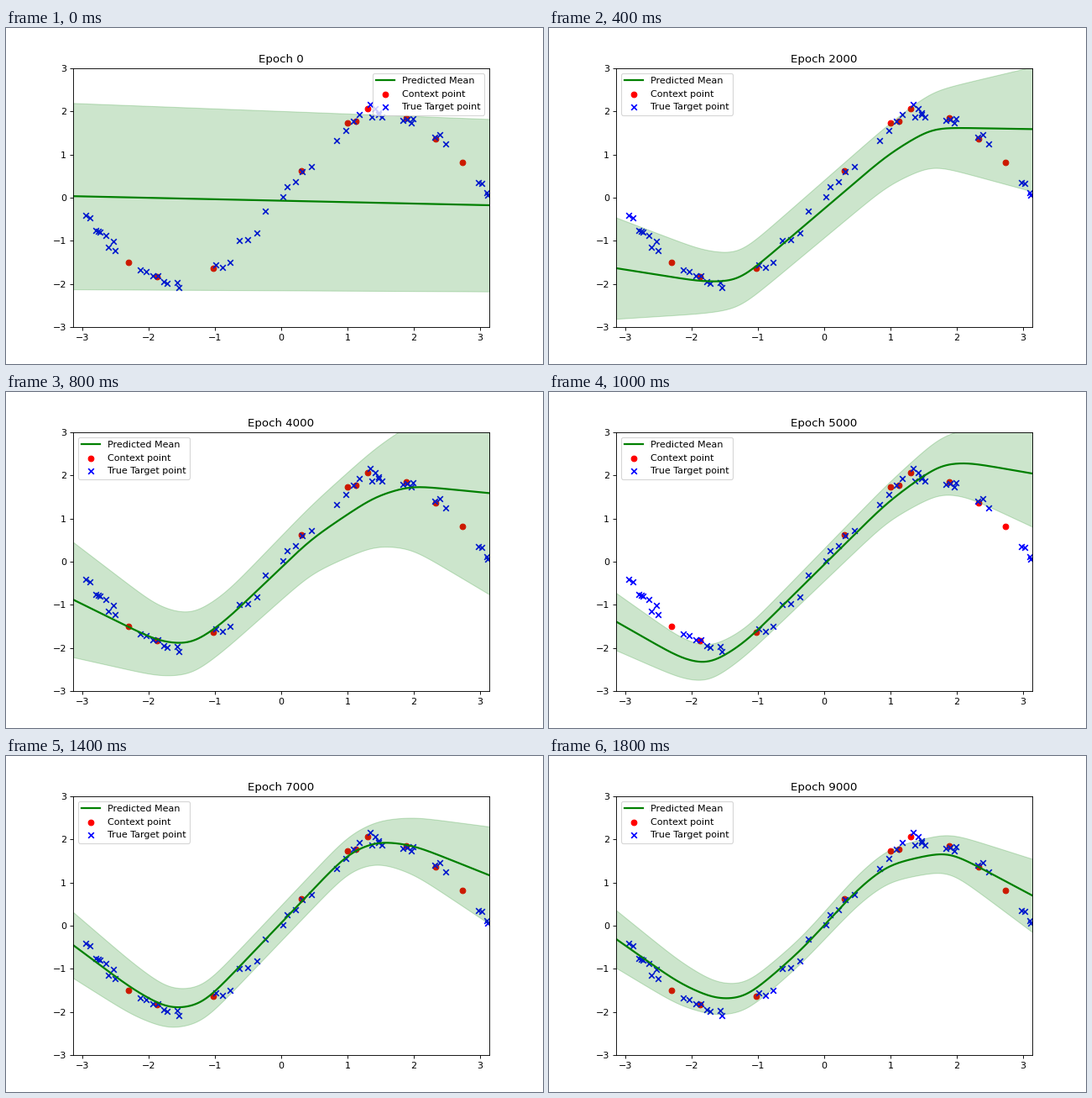
Recreate the animation shown at these times as a matplotlib script. Size 640 px wide and 400 px high, loop 2 s.

```python
import numpy as np
import matplotlib.pyplot as plt
from matplotlib.animation import FuncAnimation

PI = np.pi
GRID = np.linspace(-PI, PI, 300)
SOFT = 0.12   # how widely a curve rounds its corners
NOISE = 0.09

CONTEXT = np.array([
    (-2.30, -1.50), (-1.88, -1.83), (-1.02, -1.64), (0.305, 0.62), (1.00, 1.73),
    (1.13, 1.77), (1.30, 2.06), (1.89, 1.85), (2.325, 1.36), (2.74, 0.82),
])

# Groups of target points along x: first, last, count
GROUPS = [
    (-2.94, -2.48, 9), (-2.13, -1.52, 8), (-1.01, -0.24, 7), (0, 0.44, 5),
    (0.87, 1.20, 4), (1.33, 1.53, 6), (1.84, 2.00, 4), (2.33, 2.49, 3), (2.98, 3.12, 4),
]

# Epoch in thousands -> corners of the fit: x, mean, spread
CORNERS = {
    0: [(-PI, .035, 2.16), (PI, -.175, 2)],
    1: [(-PI, -1.49, 1.355), (-1.73, -1.49, 1.19), (1.05, .94, 1.235),
        (1.8, 1.44, 1.42), (PI, 1.43, 1.65)],
    2: [(-PI, -1.635, 1.175), (-1.85, -1.95, .735), (-1.3, -1.96, .625),
        (.95, .99, .7), (1.62, 1.63, .85), (PI, 1.59, 1.445)],
    4: [(-PI, -.88, 1.335), (-1.85, -1.86, .8), (-1.35, -1.95, .69),
        (-.85, -1.39, .645), (.45, .53, .79), (1.4, 1.51, 1.12),
        (1.95, 1.77, 1.44), (PI, 1.59, 2.35)],
    5: [(-PI, -1.39, .665), (-2.15, -2.26, .46), (-1.75, -2.43, .4),
        (-1.2, -1.89, .31), (.95, 1.38, .43), (1.75, 2.28, .65),
        (2.15, 2.31, .79), (PI, 2.045, 1.235)],
    7: [(-PI, -.45, .765), (-2.25, -1.47, .61), (-1.7, -1.96, .46),
        (-1.2, -1.87, .4), (1.02, 1.71, .42), (1.45, 1.98, .48),
        (2, 1.87, .66), (PI, 1.17, 1.13)],
    9: [(-PI, -.31, .67), (-2.2, -1.33, .52), (-1.65, -1.72, .38),
        (-1.2, -1.71, .315), (-.35, -.58, .3), (.5, .85, .35),
        (.95, 1.42, .385), (1.87, 1.74, .43), (PI, .7, .85)],
}

# Epochs between two fits: earlier, later, weight of the later
BLENDS = {3: (2, 4, .5), 6: (5, 7, .4), 8: (7, 9, .15)}


def noisy_sine(seed=4):
    """Target points scattered around 2 sin(x)."""
    rng = np.random.default_rng(seed)
    x = np.concatenate([np.linspace(*group) for group in GROUPS])
    x += rng.normal(0, 0.015, x.size)
    return x, 2 * np.sin(x) + rng.normal(0, NOISE, x.size)


def bend(x, y):
    """Polyline through the corners, each one rounded by a softplus hinge."""
    slope = np.diff(y) / np.diff(x)
    curve = y[0] + slope[0] * (GRID - x[0])
    for corner, turn in zip(x[1:-1], np.diff(slope)):
        curve += turn * SOFT * np.logaddexp(0, (GRID - corner) / SOFT)
    return curve


def fit(corners):
    x, mean, spread = np.array(corners).T
    return np.array([bend(x, mean), bend(x, spread)])


target = noisy_sine()
curves = {epoch: fit(corners) for epoch, corners in CORNERS.items()}
for epoch, (a, b, w) in BLENDS.items():
    curves[epoch] = (1 - w) * curves[a] + w * curves[b]

fig, ax = plt.subplots(figsize=(8, 5), dpi=80)


def draw(epoch):
    mean, spread = curves[epoch]
    ax.clear()
    ax.plot(GRID, mean, color="g", linewidth=2, label="Predicted Mean")
    ax.scatter(*CONTEXT.T, color="r", label="Context point")
    ax.scatter(*target, color="b", marker="x", label="True Target point")
    ax.fill_between(GRID, mean - spread, mean + spread, color="g", alpha=0.2)
    ax.set_xlim(-PI, PI)
    ax.set_ylim(-3, 3)
    ax.set_title(f"Epoch {epoch * 1000}")
    ax.legend(loc="upper left" if epoch else "upper right")


anim = FuncAnimation(fig, draw, frames=10, init_func=lambda: None,
                     interval=200, repeat=True, repeat_delay=0)
plt.show()
```
